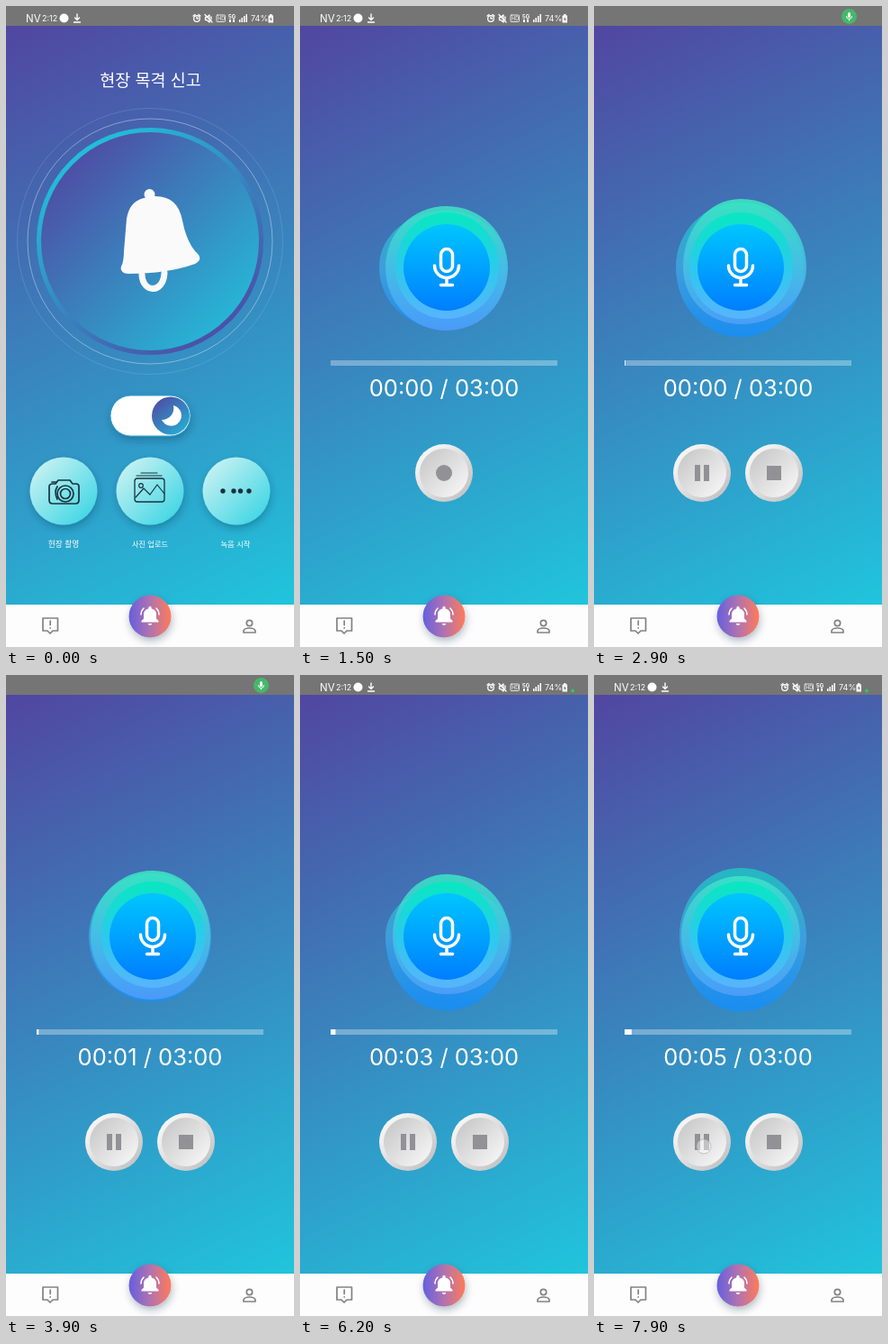
Animation, 320 px wide and 711 px high, one loop 8 s. Source, as an HTML page:

```html
<!DOCTYPE html>
<html lang="ko">
<head>
<meta charset="utf-8">
<title>Voice recorder</title>
<style>
html, body { margin: 0; width: 100%; height: 100%; overflow: hidden; background: #fdfdfd; }
svg { display: block; width: 100vw; height: 100vh; }
text { fill: #fff; font-family: Inter, sans-serif; }
.ko { font-family: "Noto Sans CJK KR", "Noto Sans CJK", sans-serif; text-anchor: middle; }
.line { fill: none; stroke-linecap: round; stroke-linejoin: round; }
</style>
</head>
<body>
<svg viewBox="0 0 320 711" xmlns="http://www.w3.org/2000/svg">
  <defs>
    <linearGradient id="sky" gradientUnits="userSpaceOnUse" x1="0" y1="22" x2="320" y2="664">
      <stop stop-color="#5146a0"/><stop offset="1" stop-color="#20c5dc"/>
    </linearGradient>
    <linearGradient id="disc" x1=".1" y1=".1" x2=".9" y2=".9">
      <stop stop-color="#5048a2"/><stop offset="1" stop-color="#24bcd8"/>
    </linearGradient>
    <linearGradient id="rim" x1=".2" y1=".1" x2=".8" y2=".9">
      <stop stop-color="#23bdd9"/><stop offset="1" stop-color="#4a52a8"/>
    </linearGradient>
    <linearGradient id="knob" x1=".1" y1="0" x2=".9" y2="1">
      <stop stop-color="#5048a2"/><stop offset="1" stop-color="#24b4d6"/>
    </linearGradient>
    <linearGradient id="mint" x1=".1" y1=".1" x2=".9" y2=".9">
      <stop stop-color="#c8f2f3"/><stop offset="1" stop-color="#3fd6e4"/>
    </linearGradient>
    <linearGradient id="raised" x1=".1" y1=".1" x2=".9" y2=".9">
      <stop stop-color="#fafafa"/><stop offset="1" stop-color="#c2c2c4"/>
    </linearGradient>
    <linearGradient id="sunken" x1=".1" y1=".1" x2=".9" y2=".9">
      <stop stop-color="#c9c9ca"/><stop offset="1" stop-color="#f5f5f5"/>
    </linearGradient>
    <linearGradient id="fab">
      <stop stop-color="#655fe0"/><stop offset=".5" stop-color="#b072b0"/><stop offset="1" stop-color="#ff7b58"/>
    </linearGradient>
    <linearGradient id="back" gradientUnits="userSpaceOnUse" x1="163" y1="215" x2="163" y2="365">
      <stop stop-color="#20c4c4"/><stop offset=".5" stop-color="#3fa4e2"/><stop offset="1" stop-color="#168ff8"/>
    </linearGradient>
    <linearGradient id="middle" gradientUnits="userSpaceOnUse" x1="163" y1="215" x2="163" y2="360">
      <stop stop-color="#3ceac2"/><stop offset=".5" stop-color="#45c4e4"/><stop offset="1" stop-color="#529cfa"/>
    </linearGradient>
    <linearGradient id="front" gradientUnits="userSpaceOnUse" x1="163" y1="225" x2="163" y2="350">
      <stop stop-color="#00ebbc"/><stop offset=".5" stop-color="#26cdea"/><stop offset="1" stop-color="#5cb4ff"/>
    </linearGradient>
    <linearGradient id="core" x2="0" y2="1">
      <stop stop-color="#00c6ff"/><stop offset="1" stop-color="#007eff"/>
    </linearGradient>
    <filter id="shadow" x="-30%" y="-30%" width="160%" height="170%">
      <feDropShadow dx="1" dy="4" stdDeviation="4" flood-color="#134" flood-opacity=".3"/>
    </filter>
    <g id="plate"><circle r="32" fill="url(#raised)"/><circle r="27" fill="url(#sunken)"/></g>
  </defs>

  <rect y="22" width="320" height="643" fill="url(#sky)"/>

  <g id="home">
    <g fill="none" stroke="#fff">
      <circle cx="160" cy="261" r="147.5" stroke-opacity=".13"/>
      <circle cx="160" cy="261" r="136" stroke-opacity=".38"/>
    </g>
    <circle cx="160" cy="261" r="123.5" fill="url(#disc)" stroke="url(#rim)" stroke-width="5"/>
    <g fill="#fafafa">
      <circle cx="159.500" cy="209" r="6"/>
      <path d="M153 213Q137 217 134 236L131 272Q131 283 128 289Q126 296 136 297Q179 297 210 286Q218 282 214 276Q201 264 196 238Q191 211 166 211Q158 211 153 213Z"/>
      <path class="line" d="M151 298C152 319 175 319 176 296" stroke="#fafafa" stroke-width="7"/>
    </g>
    <text class="ko" x="160.500" y="89" font-size="18.500" font-weight="500">현장 목격 신고</text>
    <rect x="116" y="432" width="89" height="45" rx="22.500" fill="#fff" stroke="#2c9fca" stroke-width="1" filter="url(#shadow)"/>
    <circle cx="183" cy="454.500" r="21" fill="url(#knob)"/>
    <path d="M186 443A11.500 11.500 0 1 1 173 459A13 13 0 0 0 186 443Z" fill="#fff"/>
    <g fill="url(#mint)" filter="url(#shadow)">
      <circle cx="64" cy="538" r="37.500"/><circle cx="160" cy="538" r="37.500"/><circle cx="256" cy="538" r="37.500"/>
    </g>
    <g class="line" stroke="#18333c" stroke-width="1.700">
      <path d="M52 530H55L58 526H71L74 530H78Q81 530 81 533V548Q81 552 77 552H52Q48 552 48 548V533Q48 530 52 530M51 528H55M57 547Q53 539 57 533"/>
      <circle cx="66" cy="541" r="9"/><circle cx="66" cy="541" r="5.500"/>
      <rect x="143" y="524" width="33" height="26" rx="3" stroke-width="1.300"/>
      <path d="M144 545L153 535L160 542L168 531L176 541M145 521H173M150 518H168" stroke-width="1.200"/>
      <circle cx="150" cy="532" r="2.300" stroke-width="1.200"/>
    </g>
    <g fill="#18333c">
      <circle cx="241" cy="538" r="2.700"/><circle cx="253" cy="538" r="2.700"/>
      <circle cx="260.500" cy="538" r="2.700"/><circle cx="270" cy="538" r="2.700"/>
    </g>
    <g font-size="8.700">
      <text class="ko" x="64" y="600">현장 촬영</text>
      <text class="ko" x="160" y="600" font-size="8.200">사진 업로드</text>
      <text class="ko" x="255" y="600" font-size="8.400">녹음 시작</text>
    </g>
  </g>

  <g id="recorder">
    <path id="blobBack" fill="url(#back)" opacity=".85"/>
    <path id="blobMiddle" fill="url(#middle)" opacity=".85"/>
    <path id="blobFront" fill="url(#front)" opacity=".9"/>
    <circle cx="163" cy="290" r="48" fill="url(#core)"/>
    <rect x="156.500" y="269.500" width="13" height="25" rx="6.500" fill="none" stroke="#fff" stroke-width="3.500"/>
    <path class="line" d="M149.500 288A13.500 13.500 0 0 0 176.500 288M163 302V309M156.500 309.500H169.500" stroke="#fff" stroke-width="3.500"/>
    <rect x="34" y="393" width="252" height="6" fill="#fff" fill-opacity=".32"/>
    <rect id="progress" x="34" y="393" height="6" fill="#f7faf2"/>
    <text id="clock" x="160" y="433" font-size="25.500" text-anchor="middle"></text>
    <g id="idle">
      <use href="#plate" x="160" y="518"/><circle cx="160" cy="518" r="9" fill="#919196"/>
    </g>
    <g id="active" fill="#919196">
      <use href="#plate" x="120" y="518"/><use href="#plate" x="200" y="518"/>
      <path d="M112 509H118V527H112ZM122 509H128V527H122ZM192 510H208V526H192Z"/>
    </g>
  </g>

  <rect y="664" width="320" height="47" fill="#fdfdfd"/>
  <g class="line" stroke="#828282" stroke-width="1.700">
    <path d="M41 679H57.500V693H52L49 696L46 693H41ZM49.200 682V686.500M49.200 689.800V690"/>
    <circle cx="270.500" cy="684.500" r="3.200"/>
    <path d="M264 695V693Q265 690 270.500 690T277 693V695Z"/>
  </g>
  <circle cx="160" cy="677" r="23.500" fill="url(#fab)" filter="url(#shadow)"/>
  <path d="M150.500 683.500V682L153 679.500V674Q153.500 669.500 158.300 668.500V667.500A1.700 1.700 0 0 1 161.700 667.500V668.500Q166.500 669.500 167 674V679.500L169.500 682V683.500ZM157.700 685H162.300Q161.900 687 160 687T157.700 685Z" fill="#fff"/>
  <path class="line" d="M153 668Q150 671 150 675M167 668Q170 671 170 675" stroke="#fff" stroke-width="1.500"/>

  <rect width="320" height="22" fill="#757575"/>
  <g id="status" fill="#fff">
    <text x="22" y="18" font-size="11.500">NV</text>
    <text x="40" y="17" font-size="9">2:12</text>
    <circle cx="64.500" cy="13.500" r="5"/>
    <path class="line" d="M79 9V15M76.500 13L79 15.500L81.500 13M75.500 18H82.500" stroke="#fff" stroke-width="1.400"/>
    <g class="line" stroke="#fff" stroke-width="1.300">
      <circle cx="212" cy="14" r="3.300"/><path d="M212 12V14H213.500M208 11L210 9.500M216 11L214 9.500"/>
      <path d="M221.500 12.500H223L226 10V18L223 15.500H221.500ZM221 9.500L229 18M228 12V15"/>
      <rect x="234" y="10" width="9.500" height="7.500" rx="1" stroke-width=".8"/>
    </g>
    <text x="235.200" y="16" font-size="5.500">HD</text>
    <text x="247" y="13.500" font-size="6" font-weight="700">5G</text>
    <path d="M248 18V15H250V18ZM252 18V14.500H254V18ZM259 18V15H260.500V18ZM261.500 18V13H263V18ZM264 18V11H265.500V18ZM266.500 18V9H268V18Z"/>
    <text x="272" y="17" font-size="9">74%</text>
    <path d="M291.500 10.500H293V9H295.500V10.500H297V18.500H291.500Z"/>
    <path d="M294.700 11.500L292.800 15H294.200L293.800 17.500L295.800 14H294.400Z" fill="#757575"/>
    <circle id="micDot" cx="303" cy="17.500" r="2" fill="#35c45c"/>
  </g>
  <g id="micBadge">
    <circle cx="283.500" cy="11.500" r="8.500" fill="#45b86a"/>
    <rect x="282" y="7" width="3" height="6" rx="1.500" fill="#fff"/>
    <path class="line" d="M280.500 11.500A3 3 0 0 0 286.500 11.500M283.500 14.500V16" stroke="#fff"/>
  </g>
  <circle id="touch" r="8" fill="#fff" fill-opacity=".45" stroke="#999" stroke-opacity=".5"/>
</svg>
<script>
const LOOP = 8, RECORD_AT = 2.3;
const $ = id => document.getElementById(id);
const clamp = v => Math.min(1, Math.max(0, v));
const show = (id, on) => $(id).setAttribute('visibility', on ? 'visible' : 'hidden');

// Blob poses: reach to the left, right, top and bottom of the centre.
const times = [0.1, 1.5, 2.9, 3.9, 5.1, 6.2, 7.9];
const backPoses = [
  [68, 73, 76, 80], [75, 67, 63, 69], [72, 70, 72, 77], [71, 65, 70, 72],
  [60, 71, 72, 62], [68, 72, 55, 82], [68, 73, 76, 83]
];
const middlePoses = [
  [66, 66, 67, 66], [68, 68, 68, 70], [64, 73, 76, 63], [69, 64, 73, 70],
  [70, 66, 74, 68], [60, 70, 69, 64], [66, 66, 67, 66]
];

function blobPath([l, r, t, b], turn) {
  const point = (x, y) => {
    const c = Math.cos(turn), s = Math.sin(turn);
    return `${(163 + x * c - y * s).toFixed(2)} ${(290 + x * s + y * c).toFixed(2)}`;
  };
  const k = 0.56;
  const curve = (...p) => 'C' + p.map(([x, y]) => point(x, y)).join(' ');
  return 'M' + point(0, -t) +
    curve([r * k, -t], [r, -t * k], [r, 0]) +
    curve([r, b * k], [r * k, b], [0, b]) +
    curve([-l * k, b], [-l, b * k], [-l, 0]) +
    curve([-l, -t * k], [-l * k, -t], [0, -t]) + 'Z';
}

function drawBlob(id, poses, time) {
  let i = 0;
  while (i < times.length - 2 && time >= times[i + 1]) i++;
  const part = (time - times[i]) / (times[i + 1] - times[i]);
  const mix = clamp(part);
  const pose = poses[i].map((v, n) => v + (poses[i + 1][n] - v) * mix);
  $(id).setAttribute('d', blobPath(pose, part * 2 * Math.PI));
}

function drawTouch(time) {
  const taps = [[0.25, 0.45, 256, 538], [2.1, 2.28, 160, 520], [7.8, 8, 122, 523]];
  const tap = taps.find(([from, to]) => time >= from && time < to);
  show('touch', tap);
  if (tap) $('touch').setAttribute('transform', `translate(${tap[2]} ${tap[3]})`);
}

function draw(time) {
  const page = clamp((time - 0.5) / 0.25);
  $('home').setAttribute('opacity', 1 - page);
  $('recorder').setAttribute('opacity', page);

  drawBlob('blobBack', backPoses, time);
  drawBlob('blobMiddle', middlePoses, time);
  $('blobFront').setAttribute('d', blobPath([57, 58, 61, 57], 0));

  const elapsed = Math.max(0, time - RECORD_AT);
  $('progress').setAttribute('width', 252 * elapsed / 180);
  $('clock').textContent = `00:0${Math.floor(elapsed)} / 03:00`;
  show('idle', time < RECORD_AT);
  show('active', time >= RECORD_AT);

  const badge = time >= 2.4 && time < 4.4;
  show('micBadge', badge);
  show('status', !badge);
  show('micDot', time >= 4.4);
  drawTouch(time);
}

const start = performance.now();
function tick() {
  draw((performance.now() - start) / 1000 % LOOP);
  requestAnimationFrame(tick);
}
tick();
</script>
</body>
</html>
```
